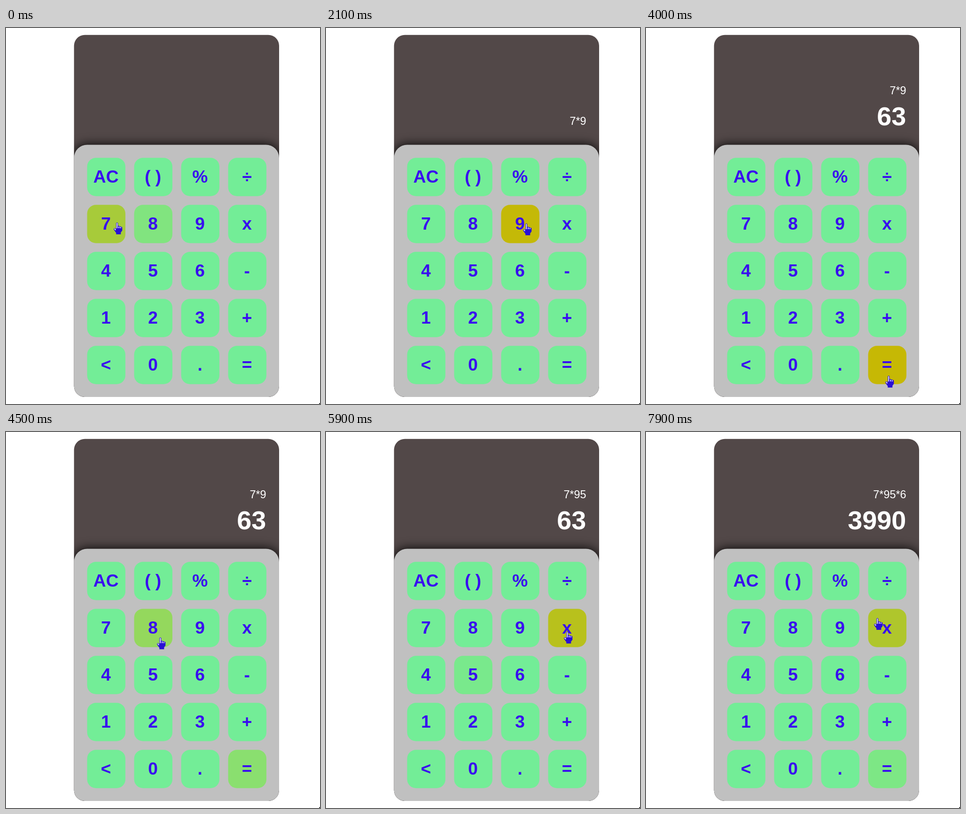
Recreate the animation shown at these times as an HTML page with a canvas. Size 668 by 800 pixels, loop 8 s.

```html
<!DOCTYPE html>
<html lang="en">
<head>
<meta charset="utf-8">
<title>Calculator</title>
<style>
  html, body { margin: 0; width: 100%; height: 100%; overflow: hidden; background: #fff; }
  canvas { display: block; }
</style>
</head>
<body>
<canvas id="stage" width="668" height="800"></canvas>
<script>
const ctx = document.getElementById('stage').getContext('2d');
const LOOP = 8000, STEP = 100;
const FADE = 100;      // time constant of the hover tint
const GAP = 80;        // pause between leaving one key and entering the next
const TRAVEL = 300;    // pointer move, ending SETTLE after the key is entered
const SETTLE = 100;

const KEYS = ['AC', '( )', '%', '÷', ...'789x456-123+<0.='];
const LEFT = 172.6, TOP = 276.3, PITCH = 100, SIZE = 81.4;
const IDLE = [115, 237, 151], HOVER = [198, 184, 4];

// Keys the pointer visits: entry time, fingertip offset from the key's centre, press time
const VISITS = [
  { key: '8', enter: -600, dx: 0, dy: -4 },
  { key: '7', enter: -100, dx: 23, dy: -3, press: 400 },
  { key: 'x', enter: 920, dx: 15, dy: 4, press: 1400 },
  { key: '9', enter: 1700, dx: 13, dy: -1, press: 2000 },
  { key: '=', enter: 2600, dx: 3, dy: 23, press: 2900 },
  { key: '8', enter: 4450, dx: 0, dy: -4 },
  { key: '5', enter: 4820, dx: -6, dy: 8, press: 5300 },
  { key: 'x', enter: 5720, dx: 0, dy: 8, press: 6100 },
  { key: '6', enter: 6630, dx: 17, dy: 3, press: 6800 },
  { key: '=', enter: 6950, dx: 3, dy: 15, press: 7600 },
  { key: 'x', enter: 7770, dx: -21, dy: -21 }
];

function keyCentre(key) {
  const i = KEYS.indexOf(key);
  return [LEFT + i % 4 * PITCH + SIZE / 2, TOP + Math.floor(i / 4) * PITCH + SIZE / 2];
}

function pointerAt(t) {
  let x, y;
  for (const { key, enter, dx, dy } of VISITS) {
    const [cx, cy] = keyCentre(key);
    const u = Math.min(1, Math.max(0, (t - enter - SETTLE) / TRAVEL + 1));
    const e = u * u * (3 - 2 * u);
    x = x === undefined ? cx + dx : x + (cx + dx - x) * e;
    y = y === undefined ? cy + dy : y + (cy + dy - y) * e;
  }
  return [x, y];
}

function hoverLevel(key, t) {
  const rise = since => 1 - Math.exp(-Math.max(0, t - since) / FADE);
  return VISITS.reduce((level, visit, i) => {
    if (visit.key !== key) return level;
    const next = VISITS[i + 1];
    return level + rise(visit.enter) - (next ? rise(next.enter - GAP) : 0);
  }, 0);
}

function screenAt(t) {
  let expr = '', result = '';
  for (const { key, press } of VISITS) {
    if (!(press <= t)) continue;
    if (key === '=') result = String(expr.split('*').reduce((a, b) => a * b));
    else expr += key === 'x' ? '*' : key;
  }
  return [expr, result];
}

function box(x, y, w, h, r, fill) {
  ctx.beginPath();
  ctx.roundRect(x, y, w, h, r);
  ctx.fillStyle = fill;
  ctx.fill();
}

function text(str, x, y, font, color, align) {
  ctx.font = font + ' "Liberation Sans", Arial, sans-serif';
  ctx.fillStyle = color;
  ctx.textAlign = align;
  ctx.fillText(str, x, y);
}

function drawBody() {
  ctx.save();
  box(144.7, 14.8, 436.3, 770.3, 23, '#524848');
  ctx.clip();
  ctx.shadowColor = '#000';
  ctx.shadowBlur = 22;
  box(144.7, 248.4, 436.3, 560, [28, 28, 0, 0], '#c0c0c0');
  ctx.restore();
}

function drawScreen(t) {
  const [expr, result] = screenAt(t);
  text(expr, 553.6, result ? 141 : 205.5, '23.4px', '#fff', 'right');
  text(result, 553.4, 206.8, 'bold 55.8px', '#fff', 'right');
}

function drawKeys(t) {
  for (const key of KEYS) {
    const [x, y] = keyCentre(key), level = hoverLevel(key, t);
    const rgb = IDLE.map((c, k) => Math.round(c + (HOVER[k] - c) * level));
    box(x - SIZE / 2, y - SIZE / 2, SIZE, SIZE, 18.6, `rgb(${rgb})`);
    text(key, x - 0.6, y + 12.2, 'bold 37.2px', '#390cf0', 'center');
  }
}

const HAND = new Path2D('M-2 1Q0-1 2 1V7Q4 6 5 8Q7 7 8 9Q11 8 11 12V17L8 21V25H-2V22L-7 15Q-7 11-4 12L-2 14Z');
const KNUCKLES = new Path2D('M0 1V12M4 8.5V12M7.5 9.5V12M-5.5 13L-3 16');

function drawPointer(t) {
  ctx.save();
  ctx.translate(...pointerAt(t));
  ctx.fillStyle = '#2a10d4';
  ctx.fill(HAND);
  ctx.strokeStyle = '#fff';
  ctx.lineWidth = 1.7;
  ctx.stroke(KNUCKLES);
  ctx.restore();
}

function frame(now) {
  const t = Math.floor(now % LOOP / STEP) * STEP;
  ctx.clearRect(0, 0, 668, 800);
  drawBody();
  drawScreen(t);
  drawKeys(t);
  drawPointer(t);
  box(666.5, 798, 1.5, 2, 0, '#000');
  requestAnimationFrame(frame);
}
requestAnimationFrame(frame);
</script>
</body>
</html>
```
